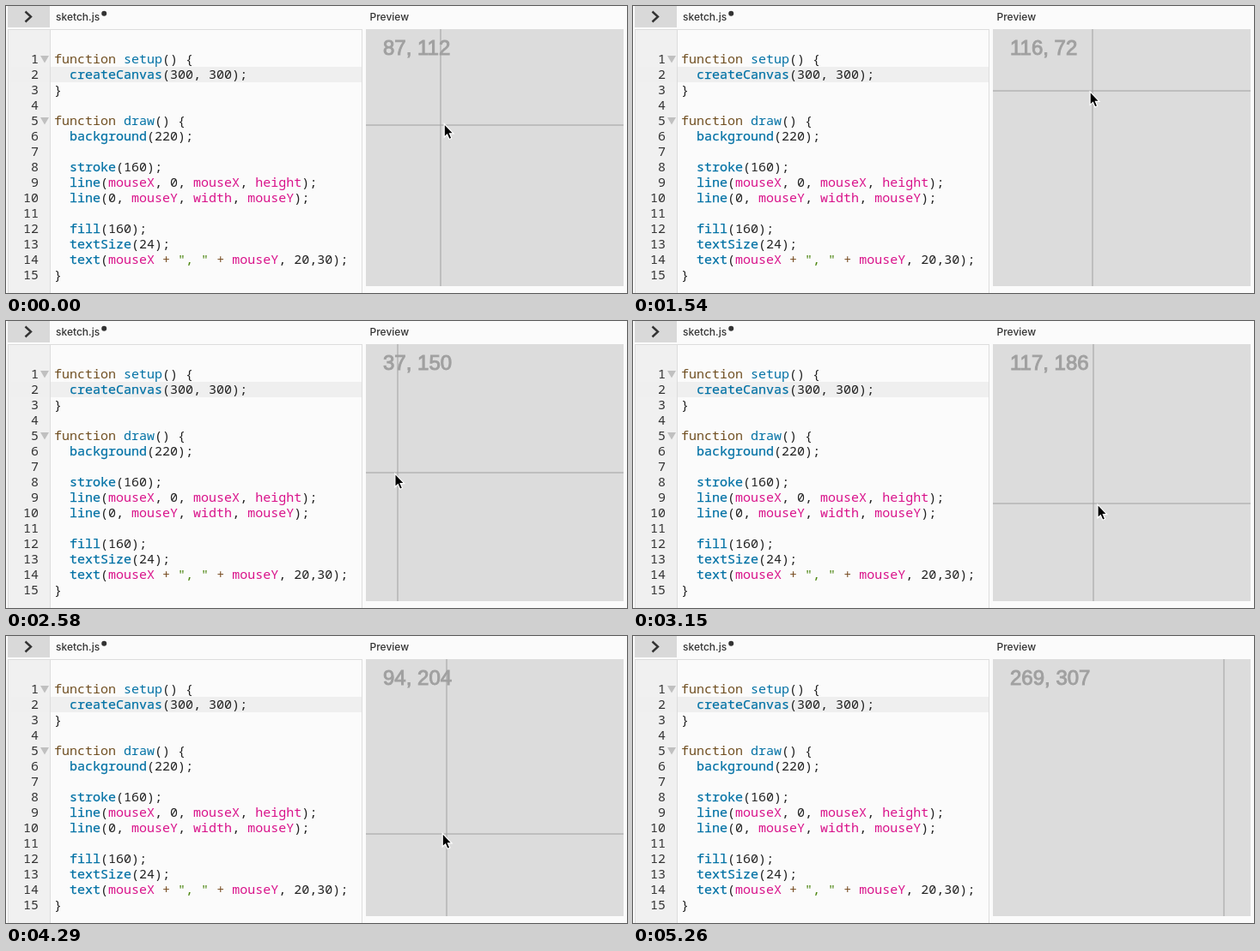
Write an HTML page that moves like this. It is 723x335 px and loops after 5550 ms.

```html
<!DOCTYPE html>
<html lang="en">
<head>
<meta charset="utf-8">
<title>Mouse position sketch</title>
<style>
  html, body { margin: 0; width: 100%; height: 100%; overflow: hidden; background: #fbfbfb; }
  svg { display: block; }
  text { white-space: pre; }
  .ui { font: 500 12px Inter, Lato, sans-serif; fill: #333; }
  .code { font: 15px "Noto Sans Mono", "DejaVu Sans Mono", monospace; font-variant-ligatures: none; fill: #222; }
  .num { text-anchor: end; fill: #333; }
  .keyword { fill: #704f21; }
  .def { fill: #0071a5; }
  .fn { fill: #0071a5; stroke: #0071a5; stroke-width: .25px; }
  .var { fill: #d9128a; }
  .op { fill: #794f24; }
  .str { fill: #47820a; }
  #label { font: 24px "Liberation Sans", Arial, sans-serif; fill: #a0a0a0; stroke: #a0a0a0; stroke-width: 1px; }
</style>
</head>
<body>
<svg width="723" height="335" viewBox="0 0 723 335">
  <rect x="2" width="49" height="25" fill="#d9d9d9"/>
  <path d="M22.5 6.5L29 12.5L22.5 18.5" fill="none" stroke="#333" stroke-width="2.4"/>
  <text class="ui" x="58" y="17.3">sketch.js</text>
  <circle cx="114.2" cy="8.7" r="3" fill="#333"/>
  <text class="ui" x="423.5" y="17.3">Preview</text>

  <rect x="2.5" y="27.5" width="412" height="320" fill="#fbfbfb" stroke="#ddd"/>
  <rect x="3" y="28" width="48" height="307" fill="#f0f0f0"/>
  <rect x="3" y="71" width="411" height="18" fill="#efefef"/>
  <path d="M51.5 28V335" stroke="#ddd"/>
  <path d="M40 58h10l-5 8.5zM40 130h10l-5 8.5z" fill="#c0c0c0"/>
  <g id="code" class="code"></g>

  <rect x="419" y="27" width="300" height="300" fill="#dcdcdc"/>
  <svg x="419" y="27" width="300" height="300">
    <path id="cross" stroke="#a0a0a0"/>
    <text id="label" x="20" y="30"></text>
  </svg>
  <path id="cursor" d="M0 -1V14.6L3.4 11.5L5.8 17L8.6 15.8L6.3 10.4H10.8Z"
        fill="#000" stroke="#fff" stroke-width="1.2"/>
</svg>
<script>
const SVG = "http://www.w3.org/2000/svg";
const byId = id => document.getElementById(id);

const source = `function setup() {
  createCanvas(300, 300);
}

function draw() {
  background(220);

  stroke(160);
  line(mouseX, 0, mouseX, height);
  line(0, mouseY, width, mouseY);

  fill(160);
  textSize(24);
  text(mouseX + ", " + mouseY, 20,30);
}`;

const rules = [
  ["keyword", /^function$/],
  ["def", /^(setup|draw)$/],
  ["var", /^(mouseX|mouseY|width|height)$/],
  ["fn", /^[a-z]\w*$/i],
  ["op", /^\+$/],
  ["str", /^"/],
];

function add(parent, tag, attrs, text) {
  const node = document.createElementNS(SVG, tag);
  for (const key in attrs) node.setAttribute(key, attrs[key]);
  node.textContent = text;
  parent.append(node);
  return node;
}

source.split("\n").forEach((line, i) => {
  const y = 67 + 18 * i;
  add(byId("code"), "text", { class: "num", x: 38, y }, i + 1);
  const row = add(byId("code"), "text", { x: 56, y }, "");
  for (const token of line.match(/"[^"]*"|\w+|\+|[^\w"+]+/g) || []) {
    const rule = rules.find(r => r[1].test(token));
    add(row, "tspan", rule ? { class: rule[0] } : {}, token);
  }
});

// Mouse path: time in ms, x, y, then velocity in px per second
const path = [
  [0, 87, 112, 200, -30],
  [974, 134, 62, -33, -25],
  [2117, 86, 106, -75, 60],
  [2574, 37, 150, -45, 60],
  [3660, 188, 212, -33, 33],
  [4288, 94, 204, -100, 0],
  [5260, 269, 307, 150, 200],
];
const LOOP = 5550, STEP = 57.14, LAST = 5260, LAG = 0.03;

function hermite(a, b, u, axis) {
  const d = (b[0] - a[0]) / 1000;
  const p = a[axis], q = b[axis];
  const m = a[axis + 2] * d, n = b[axis + 2] * d;
  const c = 3 * (q - p) - 2 * m - n;
  const e = 2 * (p - q) + m + n;
  return {
    pos: Math.round(p + u * (m + u * (c + u * e))),
    vel: (m + u * (2 * c + 3 * u * e)) / d,
  };
}

function mouseAt(t) {
  let i = 0;
  while (i < path.length - 2 && t >= path[i + 1][0]) i++;
  const a = path[i], b = path[i + 1];
  const u = (t - a[0]) / (b[0] - a[0]);
  return [hermite(a, b, u, 1), hermite(a, b, u, 2)];
}

function draw(t) {
  const k = Math.max(0, Math.floor((t - 52) / STEP) + 1);
  const [x, y] = mouseAt(k ? Math.min(LAST, 60 + (k - 1) * STEP) : 0);
  byId("cross").setAttribute("d", `M${x.pos} 0V300M0 ${y.pos}H300`);
  byId("label").textContent = `${x.pos}, ${y.pos}`;
  // The pointer runs slightly ahead of the drawn lines
  const cx = 419 + x.pos - 1.8 + x.vel * LAG;
  const cy = 27 + y.pos + 0.4 + y.vel * LAG;
  byId("cursor").setAttribute("transform", `translate(${cx.toFixed(1)} ${cy.toFixed(1)})`);
}

const start = performance.now();
function tick() {
  draw((performance.now() - start) % LOOP);
  requestAnimationFrame(tick);
}
tick();
</script>
</body>
</html>
```
